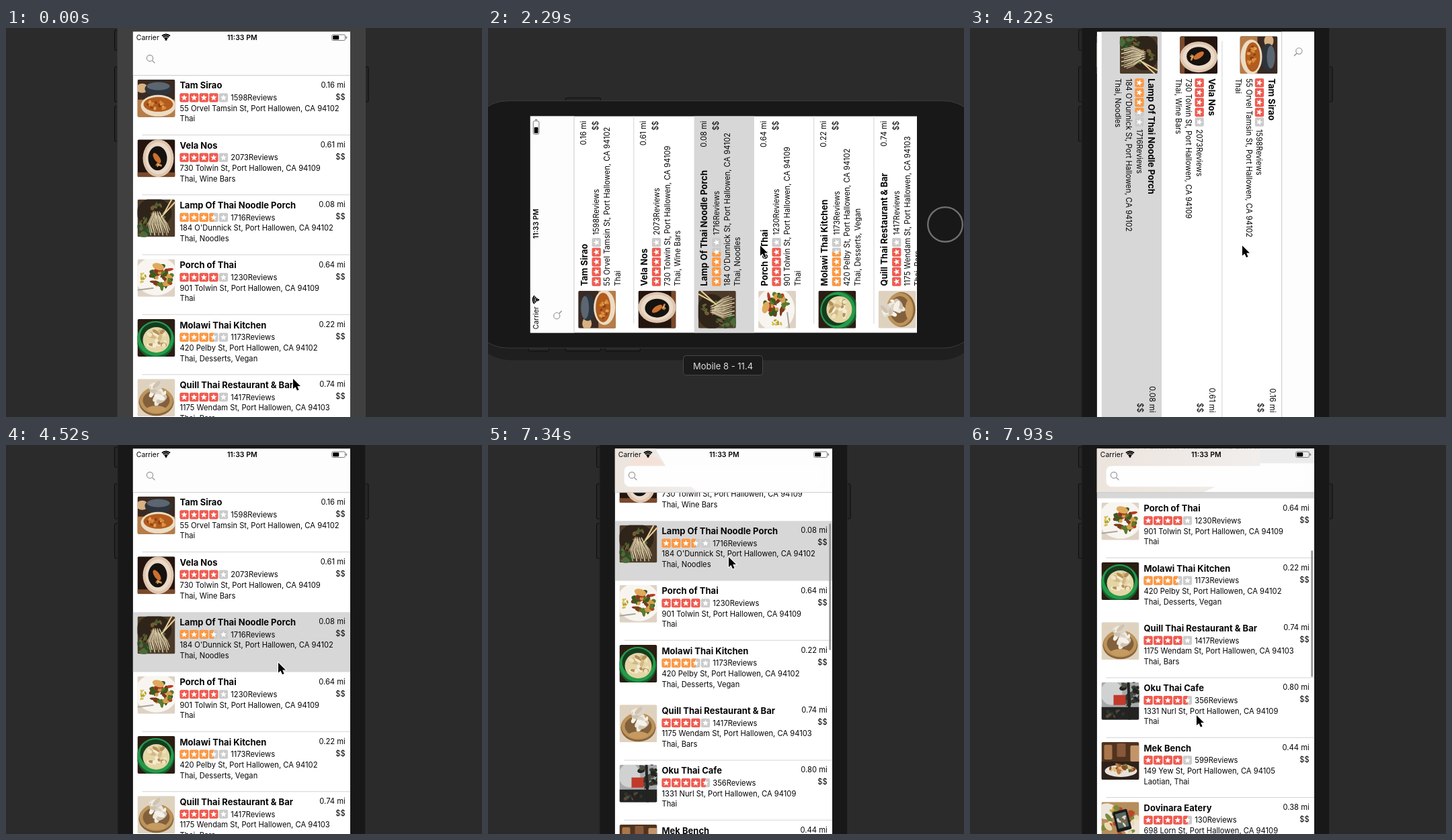
Recreate the animation shown at these times as an HTML page with a canvas. Size 708 px wide and 580 px high, loop 8 s.

```html
<!DOCTYPE html>
<html lang="en">
<head>
<meta charset="utf-8">
<title>Restaurant list</title>
<style>
html, body { margin: 0; width: 708px; height: 580px; overflow: hidden; background: #2b2b2b; }
canvas { display: block; }
</style>
</head>
<body>
<canvas id="stage" width="708" height="580"></canvas>
<script>
const g = document.getElementById('stage').getContext('2d');
const CX = 350.25, CY = 292.9, SHORT = 323.5, LONG = 575.5;
const ROW = 89.3, LOOP = 8000, SELECTED = 2;
const FONT = 'Inter, "Open Sans", sans-serif';
const lerp = (a, b, k) => a + (b - a) * k;

// Held steps: [from ms, ...values]
const mouse = [
  [0, 427, 523], [500, 354, 472], [640, 399, 330], [790, 405, 324.5],
  [6610, 382, 304], [6760, 375, 197], [6900, 344, 310], [7050, 339, 371],
  [7200, 341, 364], [7340, 358, 167], [7490, 352, 205], [7640, 345, 290],
  [7790, 340, 360], [7930, 337, 403]
];
const scrolls = [[0, 0], [7340, 136], [7490, 190], [7640, 225], [7790, 247], [7930, 259]];
// landscape share, content angle in degrees
const turns = [
  [0, 0, 0], [2290, 0, -90], [2430, .5, -45], [2580, 1, 0],
  [4220, 1, 90], [4370, .5, 45], [4520, 0, 0]
];
const at = (steps, t) => steps.filter(s => s[0] <= t).pop().slice(1);

function box(color, x, y, w, h, r = 0) {
  g.fillStyle = color;
  g.beginPath();
  g.roundRect(x, y, w, h, r);
  g.fill();
}
function oval(color, x, y, rx, ry = rx, turn = 0) {
  g.fillStyle = color;
  g.beginPath();
  g.ellipse(x, y, rx, ry, turn, 0, 7);
  g.fill();
}
function line(color, width, ...p) {
  g.strokeStyle = color;
  g.lineWidth = width;
  g.beginPath();
  for (let i = 0; i < p.length; i += 2) g.lineTo(p[i], p[i + 1]);
  g.stroke();
}
function text(str, x, y, size, weight = 400, align = 'left', color = '#050505') {
  g.font = `${weight} ${size}px ${FONT}`;
  g.textAlign = align;
  g.fillStyle = color;
  g.fillText(str, x, y);
}
function bits(n, colors, x, y, rx, ry, size) {
  let seed = n * 7 + x;
  const rnd = () => (seed = (seed * 16807 + 11) % 2147483647) / 2147483647;
  rnd(); rnd();
  for (let i = 0; i < n; i++) {
    const a = rnd() * 6.28, d = Math.sqrt(rnd());
    oval(colors[i % colors.length], x + Math.cos(a) * d * rx, y + Math.sin(a) * d * ry,
      size * (.6 + rnd()), size * (.4 + rnd() * .5), rnd() * 3);
  }
}

// Simplified dish pictures on a 56 x 56 square
const dishes = {
  curry() {
    box('#3a2a22', 0, 0, 56, 56);
    box('#b77c48', 0, 30, 56, 26);
    oval('#d8b183', 7, 13, 9, 7);
    oval('#2e343b', 31, 14, 20, 11);
    oval('#5b6670', 31, 10, 17, 6);
    oval('#ecdcc2', 31, 39, 26, 16);
    oval('#b25c1e', 31, 37, 22, 11);
    bits(16, ['#d9893a', '#8e3f14', '#e0a050'], 31, 37, 16, 7, 2.5);
  },
  plate() {
    box('#24150f', 0, 0, 56, 56);
    box('#7a4a2b', 0, 49, 56, 7);
    oval('#dfc5ae', 31, 28, 23, 28);
    oval('#ead9c6', 31, 28, 19, 24);
    oval('#15120f', 30, 28, 14, 18);
    oval('#cb7030', 29, 28, 4, 9, -.6);
    bits(5, ['#e0a662', '#d0853e'], 32, 38, 4, 2, 2);
  },
  noodles() {
    box('#4b3a28', 0, 0, 56, 56);
    oval('#2f2419', 25, 20, 26, 22);
    bits(18, ['#5d4a2e', '#45602f', '#765b36'], 22, 22, 22, 18, 3);
    bits(14, ['#4d6b38', '#2f4a26'], 9, 46, 10, 9, 4);
    for (let i = 0; i < 15; i++)
      line(i % 2 ? '#e2d5b6' : '#b9a67e', 1.5, 24 + i * .7, 18 + i % 4 * 2, 16 + i * 2, 36, 20 + i * 2, 54 - i % 3 * 4);
    line('#ecd09a', 2, 56, 4, 35, 27);
    line('#ecd09a', 2, 51, 0, 39, 22);
  },
  stirfry() {
    box('#ddd2c4', 0, 0, 56, 56);
    oval('#f8f5f0', 28, 25, 32, 29);
    bits(12, ['#b3a12f', '#d4bf52'], 8, 27, 4, 9, 1.7);
    bits(40, ['#5d7a2e', '#b93a24', '#d6a04c', '#3e5a20', '#7b3b1c'], 36, 25, 15, 16, 4.5);
    oval('#dfaa5c', 31, 11, 9, 5, .3);
    line('#aaa49b', 2, 0, 46, 24, 43);
  },
  soup() {
    box('#2b1d14', 0, 0, 56, 56);
    oval('#145f2c', 27, 31, 28, 28);
    oval('#259a49', 27, 29, 27, 26);
    oval('#143d20', 27, 26, 23, 21);
    oval('#e4d5a6', 28, 31, 20, 19);
    bits(20, ['#f4ecd4', '#d3b884', '#efe2bd', '#b69059'], 28, 30, 15, 14, 4);
  },
  basket() {
    box('#ded2bf', 0, 0, 56, 56);
    oval('#8c6538', 28, 34, 26, 21);
    oval('#bc935b', 28, 32, 25, 20);
    oval('#82603b', 28, 32, 20, 15);
    bits(16, ['#eee9df', '#dcd3c4', '#f5f1e9', '#cfc3b0'], 28, 21, 14, 13, 7);
    oval('#c69b62', 28, 45, 14, 5);
  },
  sign() {
    box('#a6aaab', 0, 0, 56, 56);
    oval('#d0d2d2', 15, 16, 16, 18);
    bits(35, ['#34362f', '#4b4c43', '#22241f'], 46, 15, 15, 19, 4);
    box('#232321', 0, 37, 56, 19);
    line('#222', 4, 40, 0, 42, 56);
    box('#c23a2c', 18, 19, 18, 15);
    bits(8, ['#514a3b', '#32332d'], 18, 47, 17, 6, 3);
  },
  table() {
    box('#50331f', 0, 0, 56, 56);
    box('#aa764c', 4, 4, 12, 22, 2);
    box('#87583a', 23, 2, 13, 20, 2);
    box('#c29469', 43, 5, 13, 24, 2);
    box('#2e211b', 0, 29, 56, 27);
    oval('#e8e2da', 29, 43, 24, 9);
    bits(22, ['#8b4a25', '#c07a3f', '#577039', '#e0bd85'], 29, 40, 18, 6, 3.5);
  },
  feast() {
    box('#b68d5c', 0, 0, 56, 56);
    oval('#ede6dc', 8, 14, 15, 12);
    oval('#eee4d4', 48, 37, 15, 16);
    bits(28, ['#d9a441', '#7a8a3c', '#b6492a', '#ead9b0'], 28, 29, 27, 25, 5);
    g.rotate(-.25);
    box('#17191b', 12, 19, 22, 31, 2);
    box('#596760', 15, 23, 16, 22);
    bits(9, ['#ddd8cc', '#8a6b45'], 23, 34, 6, 8, 2.5);
  }
};

const CITY = ', Port Hallowen, CA ';
const places = [
  ['Tam Sirao', 4, 1598, '55 Orvel Tamsin St' + CITY + 94102, 'Thai', '0.16', 'curry'],
  ['Vela Nos', 4, 2073, '730 Tolwin St' + CITY + 94109, 'Thai, Wine Bars', '0.61', 'plate'],
  ['Lamp Of Thai Noodle Porch', 3.5, 1716, "184 O'Dunnick St" + CITY + 94102, 'Thai, Noodles', '0.08', 'noodles'],
  ['Porch of Thai', 4, 1230, '901 Tolwin St' + CITY + 94109, 'Thai', '0.64', 'stirfry'],
  ['Molawi Thai Kitchen', 3.5, 1173, '420 Pelby St' + CITY + 94102, 'Thai, Desserts, Vegan', '0.22', 'soup'],
  ['Quill Thai Restaurant & Bar', 4, 1417, '1175 Wendam St' + CITY + 94103, 'Thai, Bars', '0.74', 'basket'],
  ['Oku Thai Cafe', 4.5, 356, '1331 Nurl St' + CITY + 94109, 'Thai', '0.80', 'sign'],
  ['Mek Bench', 4, 599, '149 Yew St' + CITY + 94105, 'Laotian, Thai', '0.44', 'table'],
  ['Dovinara Eatery', 4.5, 130, '698 Lorn St' + CITY + 94109, 'Thai', '0.38', 'feast']
];

function stars(rating, x, y) {
  const color = rating === 3.5 ? '#fd9843' : '#f15b50';
  for (let i = 0; i < 5; i++, x += 14.6) {
    const share = Math.min(1, Math.max(0, rating - i));
    box('#cbcbcb', x, y, 13.2, 13.2, 2);
    if (share) box(color, x, y, 13.2 * share, 13.2, share < 1 ? [2, 0, 0, 2] : 2);
    g.fillStyle = '#fff';
    g.beginPath();
    for (let p = 0; p < 10; p++) {
      const r = p % 2 ? 2.1 : 4.9, a = p * Math.PI / 5;
      g.lineTo(x + 6.6 + Math.sin(a) * r, y + 6.8 - Math.cos(a) * r);
    }
    g.fill();
  }
}

function drawRow([name, rating, reviews, address, kinds, miles, dish], y, w) {
  g.save();
  g.translate(7, y + 6.2);
  g.beginPath();
  g.roundRect(0, 0, 56, 56, 2.5);
  g.clip();
  dishes[dish]();
  g.restore();
  text(name, 70, y + 19.8, 13, 700);
  stars(rating, 70, y + 26.6);
  text(reviews + 'Reviews', 145.8, y + 37.4, 11.2);
  text(address, 70, y + 53.2, 11.2);
  text(kinds, 70, y + 68.8, 11.2);
  text(miles + ' mi', w - 7.3, y + 18, 11.2, 400, 'right');
  text('$$', w - 7.3, y + 36, 11.2, 400, 'right');
}

function statusBar(w) {
  text('Carrier', 5.3, 12.7, 10.4);
  text('11:33 PM', w / 2 + 1, 12.7, 10.5, 600, 'center');
  g.strokeStyle = '#000';
  g.lineWidth = 1.9;
  for (const r of [3.6, 6.4, 9]) {
    g.beginPath();
    g.arc(49.5, 13.3, r, -2.3, -.84);
    g.stroke();
  }
  oval('#000', 49.5, 12.2, 1.5);
  g.strokeStyle = '#777';
  g.lineWidth = 1;
  g.beginPath();
  g.roundRect(w - 27.3, 4.8, 19.8, 8.6, 2);
  g.stroke();
  box('#000', w - 25.8, 6.2, 9, 5.8, 1);
  box('#777', w - 6.4, 7.4, 1.5, 3.4, 1);
}

function header(w, top, k, scroll, settled) {
  box('#fdfdfd', 0, 0, w, top);
  if (scroll) {
    const q = (scroll - 136) / 123, a = lerp(60, 245, q), b = lerp(124, 158, q);
    const tint = g.createLinearGradient(0, 0, Math.max(a, b), 0);
    tint.addColorStop(0, '#ece4dd');
    tint.addColorStop(1, '#f1eeec');
    g.fillStyle = tint;
    g.beginPath();
    g.moveTo(0, 0);
    g.lineTo(a, 0);
    g.lineTo(lerp(76, 243, q), 26);
    g.lineTo(b, top);
    g.lineTo(0, top);
    g.fill();
    if (q < .5) oval('#f4e2d9', 46, 26, 26, 15);
    if (q > .9) box('#ececec', 243, 0, w - 243, 22);
    box('#fefefe', 14, 26, w - 28, 31, 8);
  }
  if (!settled) box('#c9c9cb', 0, top - .5, w, 1);
  const x = lerp(25.5, 29.2, k), y = lerp(39.8, 22.6, k);
  g.strokeStyle = '#8e8e93';
  g.lineWidth = 1.1;
  g.beginPath();
  g.arc(x, y, 4.6, 0, 7);
  g.stroke();
  line('#8e8e93', 1.3, x + 3.4, y + 3.4, x + 7.4, y + 7.4);
  if (k < .5) statusBar(w);
}

function drawScreen(t, k, angle, scroll) {
  const w = lerp(SHORT, LONG, k), h = lerp(LONG, SHORT, k), top = lerp(65.5, 48.3, k);
  const sel = t >= 1090 ? SELECTED : -9;
  g.translate(-w / 2, -h / 2);
  g.beginPath();
  g.rect(0, 0, w, h);
  g.clip();
  box('#fff', 0, 0, w, h);
  places.forEach((place, i) => {
    const y = top + i * ROW - scroll;
    if (y > h || y < -ROW) return;
    if (i === sel) box('#d7d7d7', 0, y, w, ROW);
    else if (i !== sel - 1 && !(scroll && i === 4)) box('#d3d3d5', 14, y + ROW - 1, w, 1);
    drawRow(place, y, w);
  });
  if (scroll) box('#8f8f8f', w - 4.6, 68 + scroll * .325, 2.5, 188.5, 1.2);
  header(w, top, k, scroll, k === 1 && !angle);
}

function drawDevice(t, landscape) {
  const body = [166, -84.5, 368.5, 761, 56];
  if (t >= 1090 && t < 4220) {
    if (landscape) box('#1f1f1f', 148, -84.5, 368.5, 761, 60);
    else box('#222', 149, -100, 403, 800, 60);
  }
  g.lineWidth = 1;
  for (const [x, y, h] of [[161.5, 3, 30], [161.5, 58, 52], [161.5, 117, 52], [532.5, 58, 52]]) {
    box('#262626', x, y, 6.5, h, 1.5);
    g.strokeStyle = '#0c0c0c';
    g.stroke();
  }
  box(t < 1090 ? '#404040' : '#181818', ...body);
  g.strokeStyle = t < 1090 ? '#404040' : landscape ? '#3c3c3c' : '#262626';
  g.stroke();
  g.strokeStyle = '#707070';
  g.lineWidth = 2.4;
  g.beginPath();
  g.arc(CX, 622.7, 25.8, 0, 7);
  g.stroke();
  g.beginPath();
  g.rect(CX - SHORT / 2, CY - LONG / 2, SHORT, LONG);
  g.clip();
  g.fillStyle = '#000';
  g.fill();
}

function label() {
  box('#1b1b1b', 290.5, 488.5, 118, 29, 4);
  g.strokeStyle = '#484848';
  g.lineWidth = 1;
  g.stroke();
  text('Mobile 8 - 11.4', 349.5, 508.5, 13, 400, 'center', '#dedede');
}

function cursor(x, y) {
  const shape = new Path2D('M0 0V15L3.5 11.9L6 17.5L8.6 16.4L6.2 10.9H11Z');
  g.save();
  g.translate(x, y);
  g.strokeStyle = '#fff';
  g.lineWidth = 1.8;
  g.stroke(shape);
  g.fillStyle = '#000';
  g.fill(shape);
  g.restore();
}

function draw(now) {
  const t = now % LOOP, landscape = t >= 2290 && t < 4220;
  const [k, angle] = at(turns, t), [scroll] = at(scrolls, t);
  g.setTransform(1, 0, 0, 1, 0, 0);
  box('#2b2b2b', 0, 0, 708, 580);
  g.save();
  g.translate(CX, CY);
  if (landscape) g.rotate(-Math.PI / 2);
  g.translate(-CX, -CY);
  drawDevice(t, landscape);
  g.setTransform(1, 0, 0, 1, CX, CY);
  g.rotate(angle * Math.PI / 180);
  drawScreen(t, k, angle, scroll);
  g.restore();
  if (landscape) label();
  cursor(...at(mouse, t));
}

const start = performance.now();
function tick() {
  draw(performance.now() - start);
  requestAnimationFrame(tick);
}
tick();
</script>
</body>
</html>
```
